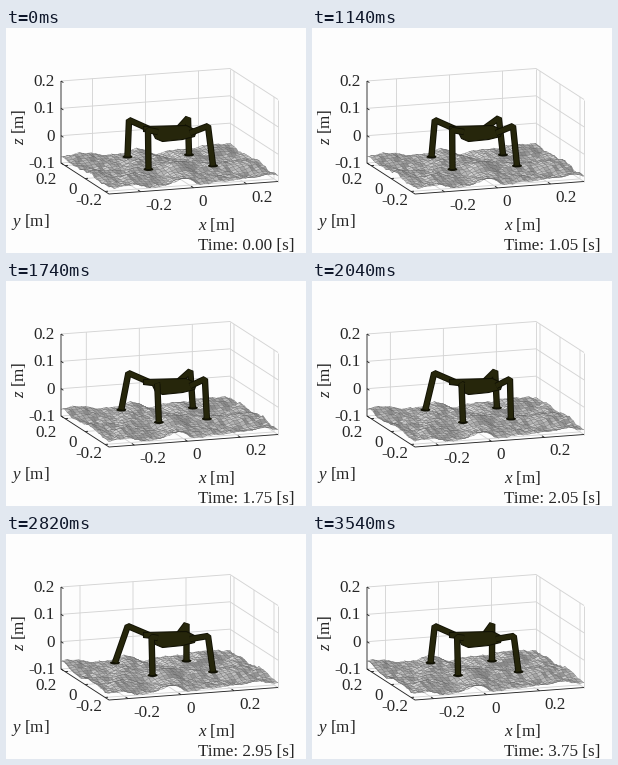
Animation, 300 px wide and 225 px high, one loop 3.6 s. Source, as a matplotlib script:

```python
import numpy as np
import matplotlib.pyplot as plt
from matplotlib.animation import FuncAnimation
from matplotlib.collections import LineCollection, PolyCollection
from matplotlib.patches import Ellipse

plt.rcParams.update({
    "font.family": "Liberation Serif",
    "mathtext.fontset": "custom",
    "mathtext.it": "Liberation Serif:italic",
    "mathtext.rm": "Liberation Serif",
})

W, H, DPI = 300, 225, 100
FRAMES, INTERVAL = 60, 60
PX = 72 / DPI
FONT = 17 * PX

# Box edges in pixels, starting at the front left bottom corner
ORIGIN = np.array([103.0, 166.0])
EDGE_X = np.array([169.0, -12.5])
EDGE_Y = np.array([-48.0, -31.0])
EDGE_Z = np.array([0.0, -82.0])
X_SCALE = 265.0
X_HALF = EDGE_X[0] / X_SCALE / 2
Y_HALF = 0.24

PAPER, INK, GRID = "#fdfdfd", "#262626", "#d4d4d4"
SHELL, EDGE = "#26260b", "#111104"

# Gait: one leg swings at a time while the view follows the body
FIRST_SWING, PERIOD, SWING = 0.2, 0.95, 0.6
LIFT, TRAVEL = 6, 13

# Hip, knee and foot at rest, turn in the gait, stride, knee follow, knee sag
LEGS = {
    "back_left": ((143, 101), (123, 92), (121.5, 128.5), 3, 10, 0.1, 0),
    "back_right": ((173, 100), (182, 90), (183, 126.5), 0, 10, 0.6, 0),
    "front_left": ((152, 104), (142, 102), (142.5, 141), 1, 16.5, 0.9, 1),
    "front_right": ((184, 105), (202, 98), (207, 137.5), 2, 12.5, 0.5, 4),
}
BODY = [(137, 98), (180, 97), (190, 102), (188, 108),
        (176, 111), (156, 113), (149, 110), (146, 104), (137, 103)]


def ease(s):
    s = np.clip(s, 0, 1)
    return s * s * (3 - 2 * s)


def project(u, v, w=0.0):
    """Map box coordinates in 0..1 to stage pixels."""
    return (ORIGIN + np.multiply.outer(u, EDGE_X)
            + np.multiply.outer(v, EDGE_Y) + np.multiply.outer(w, EDGE_Z))


def smooth(a, axis):
    """Circular blur along one axis."""
    return sum(np.roll(a, k, axis) * (3 - abs(k)) for k in range(-2, 3)) / 9


def make_terrain():
    rng = np.random.default_rng(7)
    xs = np.arange(-0.36, 0.42, 0.0155)
    ys = np.linspace(Y_HALF, -Y_HALF, 24)
    height = np.full((len(ys), len(xs)), 0.07)
    for passes, gain in ((0, 0.008), (1, 0.01), (3, 0.016)):
        layer = rng.normal(size=height.shape)
        for _ in range(passes):
            layer = smooth(smooth(layer, 0), 1)
        height += gain * layer / layer.std()
    return xs, ys, np.clip(height, 0.02, 0.15)


TX, TY, TERRAIN = make_terrain()


def sample_time(i):
    """Simulated time; playback runs slightly faster after the start."""
    return 0.05 * max(min(i, 4), i - 1, (4 * i - 11) // 3)


def terrain_mesh(center):
    lo, hi = center - X_HALF, center + X_HALF
    inner = TX[(TX > lo) & (TX < hi)]
    xs = np.concatenate(([lo], inner, [hi]))
    h = np.array([np.interp(xs, TX, row) for row in TERRAIN])
    u, v = np.meshgrid((xs - lo) / (hi - lo), (TY + Y_HALF) / (2 * Y_HALF))
    p = project(u, v, h)
    quads = np.stack([p[:-1, :-1], p[:-1, 1:], p[1:, 1:], p[1:, :-1]], axis=2)
    slope = (h[1:, 1:] - h[:-1, :-1]) * 6
    shade = np.clip(0.72 + slope, 0.54, 0.86).ravel()
    return PolyCollection(quads.reshape(-1, 4, 2),
                          facecolors=np.repeat(shade[:, None], 3, axis=1),
                          edgecolors="#636363", linewidths=0.2)


def lines(ax, segs, color, width):
    ax.add_collection(LineCollection(segs, colors=color, linewidths=width * PX))


def label(ax, x, y, text, **kw):
    style = dict(fontsize=FONT, color=INK, ha="left", va="center")
    ax.text(x, y, text, **{**style, **kw})


def draw_box(ax, center):
    x_ticks = [(x, (x - center) / (2 * X_HALF) + 0.5) for x in (-0.2, 0, 0.2)]
    y_ticks = [(y + Y_HALF) / (2 * Y_HALF) for y in (0.2, 0, -0.2)]
    z_ticks = [(0.2, 1), (0.1, 2 / 3), (0, 1 / 3), (-0.1, 0)]

    grid = [project([u, u, u], [0, 1, 1], [0, 0, 1]) for _, u in x_ticks]
    grid += [project([0, 1, 1], [v, v, v], [0, 0, 1]) for v in y_ticks]
    grid += [project([0, 1, 1], [1, 1, 0], [w, w, w]) for _, w in z_ticks]
    grid += [project([1, 1], [v, v], [0, 1]) for v in (0, 1)]
    lines(ax, grid, GRID, 0.9)

    axes = [project([1, 0, 0, 0], [0, 0, 1, 1], [0, 0, 0, 1])]
    for value, u in x_ticks:
        p = project(u, 0)
        axes.append([p, p + (-2.4, -1.6)])
        label(ax, p[0] + 5, p[1] + 14, f"{value:g}")
    for v in y_ticks:
        p = project(0, v)
        axes.append([p, p + (3, -0.2)])
    for value, w in z_ticks:
        p = project(0, 1, w)
        axes.append([p, p + (2.4, 1.6)])
        label(ax, 49, p[1] + 1, f"{value:g}", ha="right")
    lines(ax, axes, INK, 0.9)

    for x, y, text in ((51, 152, "0.2"), (71, 162, "0"), (96, 173, "-0.2")):
        label(ax, x, y, text, ha="right")
    label(ax, 191.5, 197.5, "$x$ [m]")
    label(ax, 5, 194, "$y$ [m]")
    label(ax, 12.5, 99, "$z$ [m]", ha="center", rotation=90)


def draw_limb(ax, points):
    for color, width in ((EDGE, 6.4), (SHELL, 4.6)):
        ax.plot(*zip(*points), color=color, lw=width * PX,
                solid_capstyle="butt", solid_joinstyle="bevel")


def draw_leg(ax, name, t, drift):
    hip, knee, foot, turn, stride, follow, sag = LEGS[name]
    s = np.clip((t - FIRST_SWING - turn * PERIOD) / SWING, 0, 1)
    lift = LIFT * np.sin(np.pi * s)
    shift = stride * ease(s) - drift
    end = foot[0] + shift, foot[1] - lift
    bend = knee[0] + follow * shift, knee[1] + sag * ease(s) - lift
    ax.add_patch(Ellipse((end[0], end[1] + 0.3), 10, 3.4, color=EDGE, lw=0))
    draw_limb(ax, [hip, bend, end])


def draw_robot(ax, t, drift):
    draw_leg(ax, "back_left", t, drift)
    draw_leg(ax, "back_right", t, drift)
    ax.add_collection(PolyCollection([BODY], facecolors=SHELL,
                                     edgecolors=EDGE, linewidths=0.8))
    draw_leg(ax, "front_left", t, drift)
    draw_leg(ax, "front_right", t, drift)


fig = plt.figure(figsize=(W / DPI, H / DPI), dpi=DPI, facecolor=PAPER)
ax = fig.add_axes([0, 0, 1, 1])


def draw(i):
    ax.clear()
    ax.set(xlim=(0, W), ylim=(H, 0))
    ax.axis("off")
    t = sample_time(i)
    drift = TRAVEL * ease((t - 0.3) / 3)
    center = drift / X_SCALE
    draw_box(ax, center)
    ax.add_collection(terrain_mesh(center))
    draw_robot(ax, t, drift)
    label(ax, 192.5, 217.5, f"Time: {t:.2f} [s]")
    # Stack artists in the order they were drawn
    for z, artist in enumerate(ax.get_children()):
        artist.set_zorder(z)
    return []


anim = FuncAnimation(fig, draw, frames=FRAMES, interval=INTERVAL,
                     init_func=lambda: [], repeat=True, repeat_delay=0)
plt.show()
```
